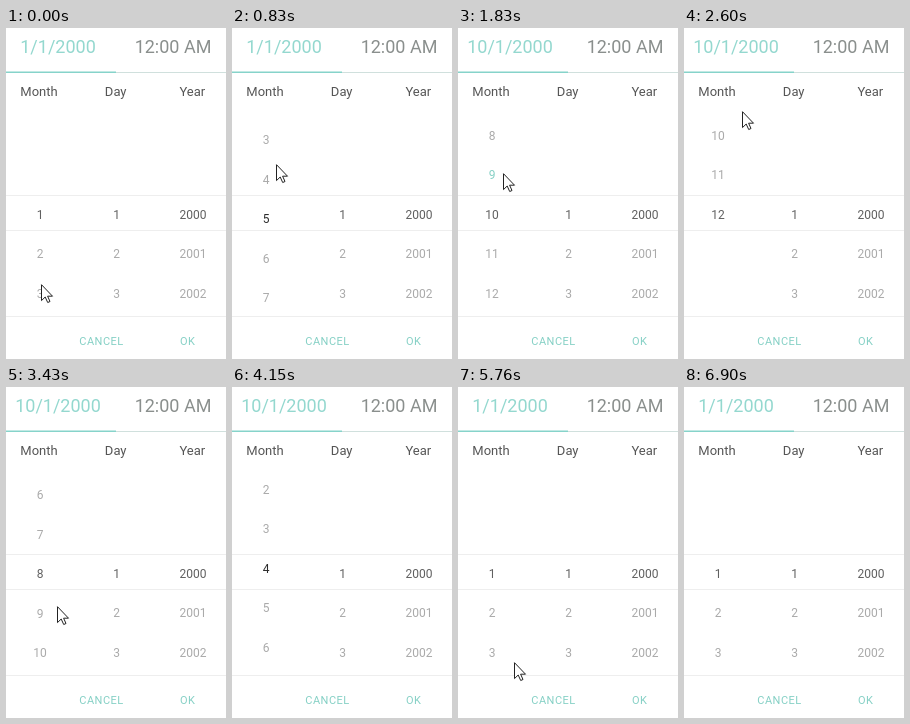
An HTML page that plays this animation: 220 px wide and 331 px high, repeating every 7740 ms.

```html
<!DOCTYPE html>
<html lang="en">
<head>
<meta charset="utf-8">
<title>Date picker</title>
<style>
  html, body { margin: 0; width: 100%; height: 100%; overflow: hidden; background: #fff; }
  svg { display: block; width: 220px; height: 331px; }
  text { font-family: Roboto, Arial, sans-serif; text-anchor: middle; }
  .tab { font-size: 18px; fill: #8a8f8d; }
  .head { font-size: 13px; fill: #555; }
  .num { font-size: 12px; fill: #aaa; }
  .num.on { fill: #606060; }
  .num.on.moving { fill: #2c2c2c; }
  .btn { font-size: 11px; letter-spacing: .5px; }
  .btn, .num.hot { fill: #85d0c5; }
  .tab.on { fill: #94d8cf; }
</style>
</head>
<body>
<svg viewBox="0 0 220 331">
  <text class="tab on" id="date" x="52" y="25.3">1/1/2000</text>
  <text class="tab" x="167" y="25.3">12:00 AM</text>
  <path d="M0 44.25H110" stroke="#86d3ca" stroke-width="1.5"/>
  <path d="M110 44.5H220" stroke="#d0e0dd"/>
  <text class="head" x="33" y="68.2">Month</text>
  <text class="head" x="109.7" y="68.2">Day</text>
  <text class="head" x="186.3" y="68.2">Year</text>
  <path d="M0 167.5H220M0 202.5H220M0 288.5H220" stroke="#eee"/>
  <g id="lists"></g>
  <text class="btn" x="95.5" y="317.3">CANCEL</text>
  <text class="btn" x="181.7" y="317.3">OK</text>
  <path id="cursor" d="M.5 .7V16.6L4.2 13 6.7 18.5 9 17.5 6.6 12.2H11.5Z" fill="#fff" stroke="#222"/>
</svg>
<script>
const LOOP = 7740, ROW = 39.5, BASE = 190.6, GONE = 6900;

// Key points of the gesture: time, pointer x, pointer y, wheel position
const path = [
  [200, 35, 256, 1], [830, 44, 136, 4.55], [950, 63, 95, 6],
  [1350, 38, 248, 6], [1730, 47, 116, 10], [2130, 40, 232, 10],
  [2600, 58, 83, 12], [2810, 59, 58, 12], [3000, 59, 58, 12],
  [3740, 45, 335, 5], [4450, 45, 335, 4], [4650, 43, 120, 4],
  [5220, 44, 289, 1.05], [5460, 46, 298, 1], [5760, 56, 275, 1],
  [6540, 56, 275, 1], [GONE, 172, 311, 1]
];
// When the title takes over the month
const titles = [[0, 1], [1050, 6], [1730, 10], [4240, 4], [5520, 1]];

const byId = id => document.getElementById(id);
const date = byId('date'), lists = byId('lists'), cursor = byId('cursor');

function addNum(x, row, value = '') {
  const el = document.createElementNS('http://www.w3.org/2000/svg', 'text');
  el.setAttribute('class', row ? 'num' : 'num on');
  el.setAttribute('x', x);
  el.setAttribute('y', BASE + row * ROW);
  el.textContent = value;
  lists.append(el);
  return el;
}
for (const row of [0, 1, 2]) {
  addNum(110.5, row, 1 + row);
  addNum(187, row, 2000 + row);
}
const months = [-2, -1, 0, 1, 2].map(row => ({ row, el: addNum(34, row) }));

const latest = (list, t) => list.findLast(k => k[0] <= t);

function pose(t) {
  const b = path.find(k => k[0] > t) || path[path.length - 1];
  const a = latest(path, t) || b;
  const u = a === b ? 0 : (t - a[0]) / (b[0] - a[0]);
  const [, x, y, pos] = a.map((v, i) => v + (b[i] - v) * u);
  return { x: Math.round(x), y: Math.round(y), pos, still: a[3] === b[3] };
}

function draw(t) {
  const { x, y, pos, still } = pose(t);
  const mid = Math.round(pos), shift = (mid - pos) * 11;
  const hover = still ? Math.round((y - 186) / ROW) : 0;

  for (const { row, el } of months) {
    const m = mid + row;
    el.textContent = m > 0 && m < 13 ? m : '';
    el.setAttribute('y', BASE + row * ROW + shift);
    el.classList.toggle('moving', Math.abs(shift) > 1);
    el.classList.toggle('hot', row === -1 && hover === row);
  }
  date.textContent = latest(titles, t)[1] + '/1/2000';
  cursor.setAttribute('transform', `translate(${x} ${y})`);
  cursor.setAttribute('visibility', t < GONE ? 'visible' : 'hidden');
}

const start = performance.now();
function frame() {
  draw((performance.now() - start) % LOOP);
  requestAnimationFrame(frame);
}
frame();
</script>
</body>
</html>
```
